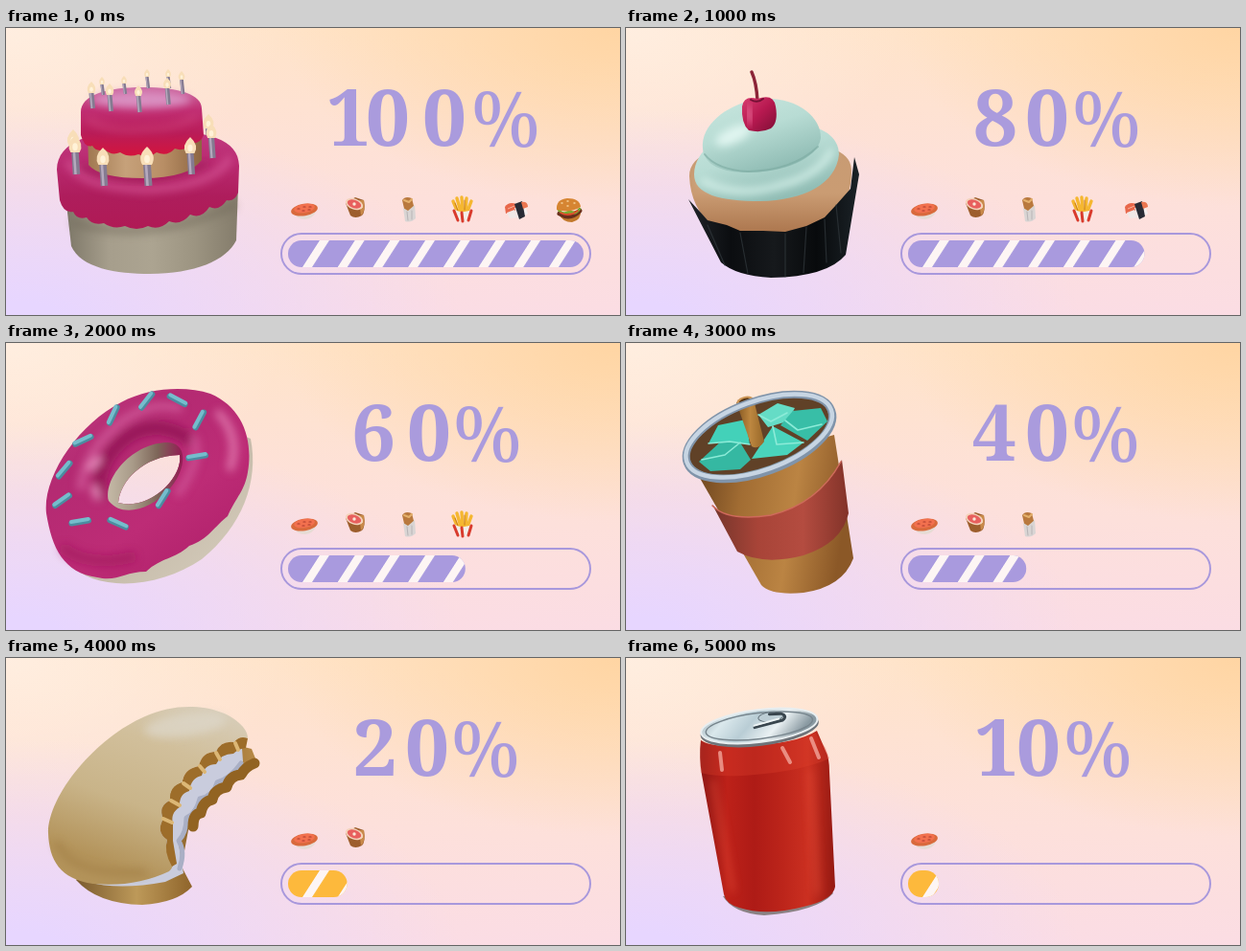
These frames come from a looping animation (640x300 px, 6000 ms). An HTML page:

```html
<!DOCTYPE html>
<html lang="en">
<head>
<meta charset="utf-8">
<title>Sweet countdown</title>
<style>
html, body { margin: 0; width: 100%; height: 100%; overflow: hidden; }
body {
  background:
    radial-gradient(ellipse 55% 62% at 100% 0, #ffd5a3, #ffd5a300),
    radial-gradient(ellipse 72% 75% at 2% 103%, #e7d6ff 10%, #e7d6ff00),
    radial-gradient(ellipse 45% 55% at 0 0, #ffeee0, #ffeee000),
    linear-gradient(5deg, #fadbe8, #fde0db 45%, #ffe4c9 92%);
}
svg { display: block; width: 100%; height: 100%; overflow: hidden; }
#strip { animation: cut 6s steps(6) infinite; }
@keyframes cut { to { transform: translateX(-3840px); } }
text { font: 700 82px "Noto Serif", serif; fill: #aa9bdd; }
.percent { font-weight: 400; font-size: 80px; }
.soft { filter: url(#soft); }
.line { fill: none; stroke-linecap: round; stroke-linejoin: round; }
</style>
</head>
<body>
<svg viewBox="0 0 640 300">
<defs>
  <filter id="soft" x="-50%" y="-50%" width="200%" height="200%"><feGaussianBlur stdDeviation="4"/></filter>
  <pattern id="stripes" width="36.7" height="60" patternUnits="userSpaceOnUse" patternTransform="translate(309 250) skewX(-32.7)">
    <rect width="10" height="60" fill="#fdf5f4"/>
  </pattern>
  <g id="gradients"></g>

  <g id="pie">
    <path d="M299 192Q303 200 312 200Q320 199 323 192Z" fill="#e6dcd5"/>
    <ellipse cx="311" cy="190" rx="14" ry="6.3" transform="rotate(-9 311 190)" fill="#d96a3c"/>
    <ellipse cx="311" cy="188.5" rx="11" ry="4.6" transform="rotate(-9 311 188)" fill="#f2704e"/>
    <path class="line" d="M304 189h2m4-2h2m4 0h2m-9 4h2m4-1h2" stroke="#a8392c" stroke-width="1.2"/>
  </g>
  <g id="ham">
    <path d="M354 183L359 196Q364 200 371 196Q375 192 373 180L364 177Z" fill="#9d5e2d"/>
    <path d="M368 180L370 196Q375 192 373 180Z" fill="#c98a4a"/>
    <ellipse cx="363" cy="184" rx="9.5" ry="5.6" transform="rotate(20 363 184)" fill="#f4d3bb"/>
    <ellipse cx="363" cy="184" rx="7.5" ry="4.2" transform="rotate(20 363 184)" fill="#e8605e"/>
    <circle cx="363" cy="184" r="1.7" fill="#fae6d6"/>
  </g>
  <g id="wrap">
    <path d="M413 180Q416 175 423 178L426 190L416 193Z" fill="#b9793e"/>
    <path d="M415 180l5 2 3-3" class="line" stroke="#e4b16d" stroke-width="2"/>
    <path d="M414 188L419 191L426 185L427 199Q422 204 416 202Z" fill="#d9d5d4"/>
    <path d="M418 192l1 9m4-10v9" class="line" stroke="#b8b4b6"/>
  </g>
  <g id="fries">
    <path class="line" d="M466 181l5 12m-1-15l4 14m1-15l1 15m4-14l-1 14m6-11l-4 11" stroke="#f5b731" stroke-width="3.4"/>
    <path class="line" d="M468 183l3 8m7-11v10" stroke="#c77d19"/>
    <path d="M465 188Q476 196 487 189L483 202H470Z" fill="#f3eee8"/>
    <path class="line" d="M467 191l4 10m4-8l1 9m9-11l-3 10" stroke="#d93b2d" stroke-width="3"/>
  </g>
  <g id="sushi">
    <path d="M520 187Q524 181 532 184L531 191L521 194Z" fill="#e8674a"/>
    <path d="M523 189l7-3" stroke="#f6b09a"/>
    <path d="M522 193l8-3 3 8-8 1Z" fill="#f0e8e7"/>
    <path d="M530 188L541 186L544 194L534 200Z" fill="#f4eeee"/>
    <path d="M530 184L538 181L541 197L535 200Z" fill="#282b35"/>
    <path d="M537 182Q544 181 544 187L539 189Z" fill="#ea7650"/>
  </g>
  <g id="burger">
    <path d="M576 194L599 190Q600 201 590 203Q580 203 576 194Z" fill="#c2792c"/>
    <path class="line" d="M577 194Q588 201 598 191" stroke="#692f1c" stroke-width="5"/>
    <path class="line" d="M576 190q4 5 8 3t7 0 7-4" stroke="#77ac32" stroke-width="2.5"/>
    <path class="line" d="M578 193q9 5 18-2" stroke="#e24b2c" stroke-width="1.6"/>
    <path d="M574 190Q573 179 585 178Q598 178 599 187Q588 194 574 190Z" fill="#d68532"/>
    <path class="line" d="M579 183h1m5-2h1m6 2h1m-8 3h1" stroke="#f7d29b" stroke-width="1.4"/>
  </g>
</defs>

<rect x="287" y="215" width="322" height="42" rx="21" fill="none" stroke="#a898dc" stroke-width="2"/>

<g id="strip">
  <g class="scene" id="cake">
    <path d="M62 175L68 228C78 251 115 257 150 257C196 257 230 243 240 222L242 165Z" fill="url(#sponge)"/>
    <path class="line soft" d="M72 204Q150 226 236 186" stroke="#6f6858" stroke-width="8" opacity=".5"/>
    <g id="backCandles"></g>
    <path d="M53 148C54 118 88 107 148 107C212 107 242 116 243 144L242 172Q238 182 230 180Q222 192 212 187Q204 200 192 195Q182 207 170 202Q160 212 148 207Q136 213 124 207Q112 211 102 204Q90 207 84 198Q74 201 70 192Q60 194 56 180Z" fill="url(#icing)"/>
    <path class="line soft" d="M66 142Q80 166 145 169Q215 165 232 138" stroke="#d85a9a" stroke-width="9" opacity=".6"/>
    <path class="line soft" d="M80 146Q140 170 208 142" stroke="#8f1a50" stroke-width="6" opacity=".5"/>
    <path d="M85 108L86 143Q97 157 143 157Q190 157 204 138V104Z" fill="url(#crumb)"/>
    <path d="M78 88C78 70 105 62 142 62C182 62 204 70 204 84L206 112Q202 122 193 120Q186 130 176 126Q168 135 157 130Q148 137 138 132Q128 136 119 130Q110 134 103 127Q94 130 90 123Q82 126 78 112Z" fill="url(#frosting)"/>
    <ellipse class="soft" cx="141" cy="75" rx="52" ry="9" fill="#dd9bcb" opacity=".85"/>
    <path class="line soft" d="M86 96Q108 110 143 106Q180 106 198 92" stroke="#dd5a8e" stroke-width="4" opacity=".5"/>
    <g id="candles"></g>
  </g>

  <g class="scene" id="cupcake">
    <path d="M66 155C66 130 100 122 150 122C205 120 237 125 235 152C234 198 200 224 150 224C100 224 68 200 66 155Z" fill="url(#muffin)"/>
    <path d="M65 179L78 193L85 201L105 206L119 212L143 212L166 213L188 207L207 198L219 185L234 168L238 135L243 153L229 237Q210 260 151 261Q115 259 99 245Z" fill="url(#paper)"/>
    <path class="line" d="M85 206l18 42m16-34l8 43m39-42v45m22-52l-3 48m22-56l2 45m10-60l5 50" stroke="#33393e" stroke-width="1.2" opacity=".7"/>
    <path d="M71 153C72 127 95 111 147 107C190 93 222 108 222 132C219 163 186 180 140 181C98 181 71 174 71 153Z" fill="url(#mint)"/>
    <path class="line soft" d="M80 160Q115 178 158 165Q200 155 214 129" stroke="#d7f2eb" stroke-width="6"/>
    <path d="M80 126C78 101 104 82 132 75C173 68 204 91 203 115C200 137 164 151 127 151C100 151 81 143 80 126Z" fill="url(#mint)"/>
    <path class="line" d="M82 132Q94 148 127 150Q174 149 200 124" stroke="#7faca4" stroke-width="2" opacity=".65"/>
    <ellipse class="soft" cx="112" cy="112" rx="20" ry="8" transform="rotate(-25 112 112)" fill="#e0f5f0"/>
    <path class="line" d="M137 76Q136 57 131 46" stroke="#8b2437" stroke-width="3.4"/>
    <path d="M121 82Q123 70 137 74Q154 68 156 82Q159 99 151 105Q141 110 128 107Q120 100 121 82Z" fill="url(#cherry)"/>
    <path class="line" d="M130 75q7 4 13-1" stroke="#741034" stroke-width="2"/>
    <path class="line soft" d="M128 84q-1 9 2 14" stroke="#f27aa5" stroke-width="5"/>
  </g>

  <g class="scene" id="donut">
    <path fill-rule="evenodd" d="M65 230C95 262 160 256 204 226C246 192 264 145 255 100L180 70L70 170ZM117 167C119 145 142 118 181 117C185 140 150 176 117 167Z" fill="url(#dough)"/>
    <path fill-rule="evenodd" d="M42 178C38 140 75 85 120 62C150 46 188 45 213 53C246 67 258 100 252 135C249 154 240 161 231 181C218 191 210 206 191 212C176 226 162 224 146 239C123 239 116 250 95 245C60 240 48 215 42 178ZM117 167C119 145 142 118 181 117C185 140 150 176 117 167Z" fill="url(#glaze)"/>
    <g class="line soft">
      <path d="M98 158Q94 120 130 96Q160 80 190 100" stroke="#8f1452" stroke-width="14" opacity=".75"/>
      <path d="M78 150Q82 114 118 84Q150 60 180 68" stroke="#d96aa6" stroke-width="9" opacity=".6"/>
      <path d="M196 100Q204 122 180 156" stroke="#d65fa0" stroke-width="9" opacity=".6"/>
      <path d="M222 74Q244 98 234 130" stroke="#e88abb" stroke-width="9" opacity=".65"/>
      <path d="M62 216Q88 234 130 224" stroke="#9c1259" stroke-width="12" opacity=".5"/>
      <path d="M88 130l8-8m-4 30l3 8" stroke="#f0a0cb" stroke-width="8" opacity=".75"/>
    </g>
    <path fill-rule="evenodd" d="M107 165C101 140 134 103 170 104C192 106 186 137 169 154C151 174 121 183 107 165ZM117 167C119 145 142 118 181 117C185 140 150 176 117 167Z" fill="url(#hole)"/>
    <g id="sprinkles"></g>
  </g>

  <g class="scene" id="drink">
    <path d="M74 136L141 253Q151 264 185 261Q226 255 237 225L217 96Z" fill="url(#wood)"/>
    <path d="M90 169Q106 187 151 180Q200 168 222 128L225 122L232 178Q225 209 185 222Q143 233 116 218Z" fill="url(#sleeve)"/>
    <path class="line" d="M90 170Q106 187 151 180Q200 168 224 124" stroke="#cf6a5b" stroke-width="1.5"/>
    <g transform="rotate(-20 139 98)">
      <ellipse cx="139" cy="98" rx="80" ry="37" fill="#8198a7"/>
      <ellipse cx="139" cy="97" rx="76" ry="33" fill="#604127"/>
    </g>
    <path d="M76 124L101 101L119 104L130 122L119 132L88 134Z" fill="#35b8a2"/>
    <path d="M86 105L96 86L125 80L129 106L108 103Z" fill="#43d1b9"/>
    <path d="M138 75L158 63L176 68L168 82L148 88Z" fill="#65dcc6"/>
    <path d="M161 86L174 71L203 68L210 82L189 102Z" fill="#38bea7"/>
    <path d="M131 121L153 87L185 104L168 117Z" fill="#4ad4bc"/>
    <path d="M86 105l22-2 21 3m-50 16l24-5 16-13m34-17l4 19 28-2m-47-29l13 7 17-9m-2 8l13 10 25-6" class="line" stroke="#8cebd8" stroke-width="1.6"/>
    <path d="M115 62L131 108Q138 112 144 103L133 59Z" fill="url(#straw)"/>
    <ellipse cx="124" cy="61" rx="9" ry="5" transform="rotate(-16 124 61)" fill="#cc9555"/>
    <ellipse cx="124" cy="61" rx="6.5" ry="3" transform="rotate(-16 124 61)" fill="#553413"/>
    <g class="line" transform="rotate(-20 139 98)">
      <ellipse cx="139" cy="98" rx="80" ry="37" stroke="#8094aa" stroke-width="8"/>
      <ellipse cx="139" cy="97" rx="80" ry="36" stroke="#c7d5e3" stroke-width="4.5"/>
    </g>
  </g>

  <g class="scene" id="cookie">
    <path d="M73 232Q95 257 142 258Q178 256 194 239L183 218L190 180L225 129L262 110L256 95L240 91L150 150Z" fill="url(#biscuitSide)"/>
    <path d="M85 234Q117 243 166 234L185 225L180 194L195 158L247 108L246 94L220 94L158 160Z" fill="#c9ccdd"/>
    <path class="line" d="M181 220q6-18-1-29 8-8 8-24 10-4 14-20 15-3 18-17 14-4 25-20" stroke="#a9afc5" stroke-width="5"/>
    <path class="line" d="M195 176q0-13 8-14 2-12 12-14 2-11 15-13 3-12 15-13 4-8 14-12" stroke="#926322" stroke-width="11"/>
    <path d="M44 183C44 143 94 83 145 61C181 44 228 49 247 72Q252 78 252 84Q243 81 238 88Q224 86 219 98Q204 98 201 113Q185 116 184 130Q170 134 171 149Q158 155 164 168Q156 182 168 190Q164 202 175 211Q174 220 170 223Q134 240 91 236C56 231 45 211 44 183Z" fill="url(#biscuit)"/>
    <path d="M252 84L250 94Q242 95 237 100Q224 100 219 111Q207 111 204 123Q193 125 191 139Q180 142 181 156Q171 162 174 174L174 191L178 215L173 218Q164 202 168 190Q156 182 164 168Q158 155 171 149Q170 134 184 130Q185 116 201 113Q204 98 219 98Q224 86 238 88Q243 81 252 84Z" fill="#9d6d2a"/>
    <path class="line" d="M239 89l3 7m-23 3l4 7m-21 7l5 6m-22 12l7 5m-20 13l9 5m-17 14l9 4" stroke="#dcb775" stroke-width="4"/>
    <path class="line soft" d="M54 195Q70 228 143 224" stroke="#9c7840" stroke-width="8" opacity=".45"/>
    <ellipse class="soft" cx="187" cy="70" rx="43" ry="12" transform="rotate(-8 187 70)" fill="#ded8cb" opacity=".7"/>
  </g>

  <g class="scene" id="can">
    <path d="M101 249Q112 267 144 269Q199 265 216 246L208 236Z" fill="#8a8284"/>
    <path d="M78 86Q88 94 126 91Q177 90 199 76L208 97Q212 104 212 119L218 239Q216 253 185 260Q146 270 118 261Q104 257 102 247L79 122Q76 103 78 86Z" fill="url(#red)"/>
    <path d="M78 120Q100 126 144 121Q189 116 212 105L208 94Q200 83 198 78Q177 90 126 91Q89 94 78 86Q76 103 78 120Z" fill="#e0422f" opacity=".3"/>
    <path class="line" d="M98 99l2 18m93-33l8 20m-38-10l8 15" stroke="#f3a69a" stroke-width="4" opacity=".8"/>
    <path class="line soft" d="M91 130l20 112m81-123l7 125" stroke="#ed5640" stroke-width="6" opacity=".4"/>
    <g transform="rotate(-7 139 72)">
      <ellipse cx="139" cy="74" rx="62" ry="18" fill="#6e747a"/>
      <ellipse cx="139" cy="71" rx="61" ry="17" fill="url(#metal)" stroke="#e8eef0" stroke-width="2"/>
      <ellipse cx="139" cy="71" rx="56" ry="13.5" fill="none" stroke="#77858d" stroke-width="1.5"/>
      <ellipse cx="152" cy="63" rx="13" ry="5" fill="#bccdd4" stroke="#66757d"/>
      <path class="line" d="M134 72L164 68Q170 64 163 61L151 60" stroke="#39464e" stroke-width="3"/>
      <path class="line" d="M134 70L160 66" stroke="#edf4f5" stroke-width="2"/>
    </g>
  </g>
</g>
</svg>

<script>
const byId = id => document.getElementById(id);

// Direction (x, y) followed by evenly spaced colours.
const gradients = {
  sponge: [1, 0, '#7d7768', '#a69e8c', '#aca491', '#9c9481', '#847c6b'],
  crumb: [1, 0, '#a07850', '#c6a17a', '#b88e65', '#8d6540'],
  icing: [0, 1, '#c23a80', '#b92a70', '#ae1d5c', '#b01a55'],
  frosting: [0, 1, '#cc6aa0', '#c02e72', '#b91c58', '#d4143c'],
  muffin: [0, 1, '#c89b73', '#ca9c73', '#a56d45'],
  paper: [1, 0, '#202429', '#0b0d10', '#16191c', '#080a0c', '#1b2227'],
  mint: [.5, 1, '#c9e7df', '#b8dcd4', '#91bdb5'],
  cherry: [1, 1, '#d83d70', '#b71950', '#7e0e35'],
  dough: [1, 1, '#8d8172', '#c3b9a7', '#d8cfbf'],
  hole: [1, 0, '#c4b9a6', '#a89a88', '#7d6558', '#931b54'],
  glaze: [.8, 1, '#c23f82', '#b42a72', '#bd2c76', '#b01f6a'],
  wood: [1, .15, '#68411d', '#a26d33', '#bb8443', '#8b5827'],
  sleeve: [1, 0, '#74352b', '#a84438', '#b44c40', '#823329'],
  straw: [1, 0, '#81541f', '#bd8740', '#976728'],
  biscuitSide: [1, 0, '#7a5a2e', '#bd9959', '#8b6027', '#b88b48'],
  biscuit: [-.4, 1, '#d9d0bf', '#d1bf9b', '#c9b489', '#b3935a'],
  red: [1, 0, '#8d1715', '#bd2119', '#ae1b16', '#bb241a', '#cb3021', '#941811'],
  metal: [1, .3, '#9daeb7', '#dae8ec', '#b9cdd5', '#eaf1f3', '#8a9aa2']
};
byId('gradients').innerHTML = Object.entries(gradients).map(([id, [x, y, ...colors]]) => {
  const stops = colors.map((c, i) => `<stop offset="${i / (colors.length - 1)}" stop-color="${c}"/>`).join('');
  return `<linearGradient id="${id}" x1="${x < 0 ? 1 : 0}" y1="0" x2="${x < 0 ? 1 + x : x}" y2="${y}">${stops}</linearGradient>`;
}).join('');

// Flame tip at (x, y); size is the flame height.
const candle = ([x, y, size, stick]) => `<g transform="translate(${x} ${y})">
  <path d="M0 ${size}l1.5 ${stick}" stroke="#857b91" stroke-width="${size * .42}"/>
  <path d="M-1 ${size}l1.5 ${stick}" stroke="#b5a9bd" stroke-width="${size * .14}"/>
  <path d="M0 0Q${size * .55} ${size * .5} ${size * .26} ${size}H${-size * .26}Q${-size * .55} ${size * .5} 0 0Z" fill="#f8deb8"/>
  <ellipse cy="${size * .68}" rx="${size * .15}" ry="${size * .22}" fill="#fff2d8"/></g>`;
byId('backCandles').innerHTML = [[70, 106, 17, 20], [211, 90, 15, 20]].map(candle).join('');
byId('candles').innerHTML = [
  [100, 51, 8, 11], [123, 50, 8, 11], [147, 43, 8, 12], [169, 43, 8, 12], [183, 45, 9, 15],
  [89, 56, 12, 16], [108, 58, 12, 17], [138, 60, 11, 17], [168, 52, 11, 17],
  [72, 112, 18, 23], [101, 125, 18, 22], [147, 124, 19, 22], [192, 114, 17, 22], [214, 100, 15, 21]
].map(candle).join('');

byId('sprinkles').innerHTML = [
  [146, 60, -52], [111, 75, -65], [80, 101, -25], [60, 132, -50], [58, 164, -35], [77, 186, -10],
  [117, 188, 24], [163, 162, -58], [199, 118, -9], [201, 80, -62], [179, 59, 28]
].map(([x, y, turn]) => `<g class="line" transform="translate(${x} ${y}) rotate(${turn})">
  <path d="M-9 1H9" stroke="#4b8ca0" stroke-width="6"/><path d="M-9 -.5H9" stroke="#75bdcc" stroke-width="4"/></g>`).join('');

const foods = ['pie', 'ham', 'wrap', 'fries', 'sushi', 'burger'];
const levels = [
  [100, '334 375 434', 485], [80, '362 416', 465], [60, '360 418', 466],
  [40, '361 416', 464], [20, '362 416', 464], [10, '363 407', 456]
];
document.querySelectorAll('.scene').forEach((scene, i) => {
  const [level, digitX, percentX] = levels[i];
  const pill = `x="294" y="222" width="${3.08 * Math.max(level, 10.4)}" height="28" rx="14"`;
  scene.setAttribute('transform', `translate(${640 * i})`);
  scene.insertAdjacentHTML('beforeend',
    `<text y="123" x="${digitX}">${level}<tspan class="percent" x="${percentX}" y="124">%</tspan></text>
    <rect ${pill} fill="${level > 20 ? '#a99ade' : '#fdb93c'}"/><rect ${pill} fill="url(#stripes)"/>` +
    foods.slice(0, 6 - i).map(id => `<use href="#${id}"/>`).join(''));
});
</script>
</body>
</html>
```
